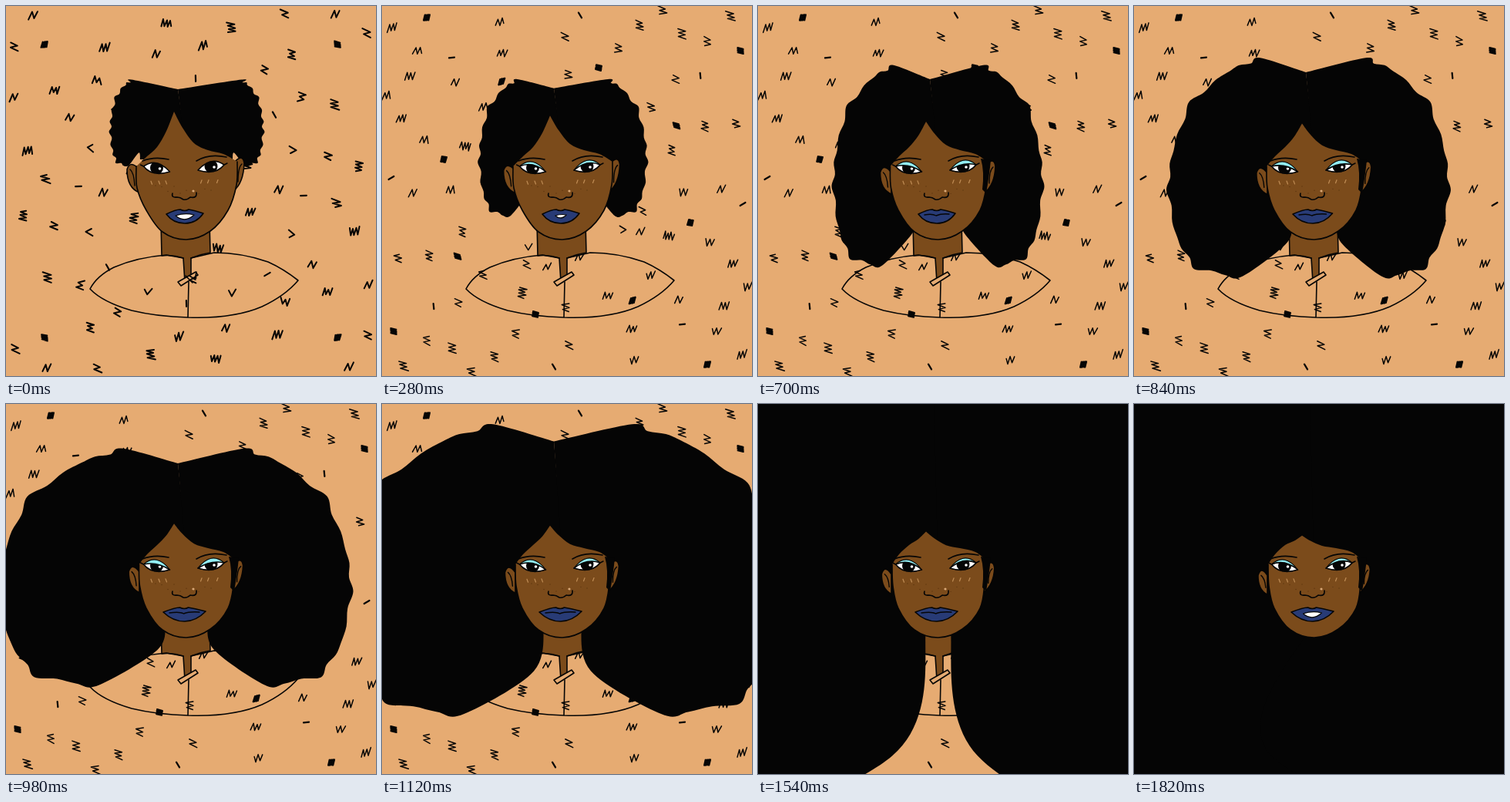
These frames come from a looping animation (480x480 px, 1960 ms). An HTML page with a canvas:

```html
<!DOCTYPE html>
<html>
<head>
<meta charset="utf-8">
<style>
html, body { margin: 0; width: 100%; height: 100%; overflow: hidden; background: #e6ab72; }
canvas { display: block; }
</style>
</head>
<body>
<canvas id="stage" width="480" height="480"></canvas>
<script>
const ctx = document.getElementById('stage').getContext('2d');
const STEP = 140, STEPS = 14;
const BG = '#e6ab72', INK = '#050505', SKIN = '#7b4b1b', LIP = '#283b76', SHADOW = '#92eef3', TICK = '#c08d55';

// x, y, strokes of each scribble; every one repeats at four quarter turns.
const FIRST = '35,12,3 50,50,9 128,54,5 118,96,4 63,109,5 10,118,3 83,145,3 28,188,6 141,132,1 195,62,3 208,22,6 256,51,4 427,10,3 187,107,2 296,109,2 163,213,5 205,166,6 354,238,3 94,234,1';
const REST = '13,28,5 58,15,9 46,57,4 90,67,1 36,91,5 95,99,3 6,116,4 25,146,5 55,173,4 80,199,9 108,182,7 12,223,1 40,242,3 89,238,4 153,20,4 156,61,5 155,98,9 132,131,4 187,104,5 145,188,3 290,167,2 266,142,3 224,154,3';

// One lobe of hair: distance out from the neck and down from the top, 0 to 1.
const LOBE = [[.4, 1], [.78, .96], [.93, .82], [1, .6], [.96, .42], [.82, .2], [.5, .05], [.25, 0]];
// step: left reach, right reach, top, bottom, half gap, parting, flare of the gap
const HAIR = {
  0: [136, 333, 97, 207, 60, 108, .05],
  3: [122, 348, 97, 305, 31, 106, .05],
  5: [98, 369, 79, 337, 31, 95, .05],
  7: [-9, 448, 60, 365, 27, 77, .05],
  9: [-90, 590, -3, 440, 21, 20, .05],
  11: [-680, 970, -300, 590, 15, -220, .05],
  13: [-680, 970, -300, 590, -4, -220, -.07]
};
const LID = { 0: [0], 3: [7], 7: [8], 9: [3.5], 13: [5] };

const lerp = (a, b, p) => a + (b - a) * p;
const clamp = x => Math.min(1, Math.max(0, x));

function tween(table, f) {
  const at = Object.keys(table).map(Number);
  const i = Math.max(1, at.findIndex(k => k >= f));
  const a = table[at[i - 1]], b = table[at[i]];
  return a.map((n, j) => lerp(n, b[j], (f - at[i - 1]) / (at[i] - at[i - 1])));
}
// Smooth curve through all points, appended to a path.
function spline(path, p, join) {
  path[join ? 'lineTo' : 'moveTo'](...p[0]);
  for (let i = 0; i < p.length - 1; i++) {
    const a = p[i - 1] || p[i], b = p[i], c = p[i + 1], d = p[i + 2] || c;
    path.bezierCurveTo(b[0] + (c[0] - a[0]) / 6, b[1] + (c[1] - a[1]) / 6,
      c[0] - (d[0] - b[0]) / 6, c[1] - (d[1] - b[1]) / 6, c[0], c[1]);
  }
}
function draw(path, fill, stroke, width = 1.6) {
  if (typeof path === 'string') path = new Path2D(path);
  if (fill) { ctx.fillStyle = fill; ctx.fill(path); }
  if (stroke) { ctx.strokeStyle = stroke; ctx.lineWidth = width; ctx.stroke(path); }
}
function dot(x, y, r, color) {
  ctx.fillStyle = color;
  ctx.beginPath();
  ctx.arc(x, y, r, 0, 7);
  ctx.fill();
}
function randoms(seed) {
  return () => (seed = (seed * 16807 + 11) % 2147483647) / 2147483647;
}

function scribble(n, seed) {
  const rnd = randoms(seed), path = new Path2D();
  const blob = n === 9, w = blob ? 7 : n === 1 ? 6 : 7 + n, tilt = rnd() * 6 - 3;
  for (let i = 0; i <= n; i++) {
    const side = i % 2 ? -1 : 1, amp = n === 1 ? 1 : blob ? 3.5 : 3 + 2.5 * rnd();
    path.lineTo((i / n - .5) * w + side * (rnd() - 1), side * amp + (i / n - .5) * tilt);
  }
  return path;
}
function scribbles(text, width) {
  for (const mark of text.split(' ')) {
    const [x, y, n] = mark.split(',').map(Number), path = scribble(n, x * 991 + y * 37);
    for (let turn = 0; turn < 4; turn++) {
      ctx.save();
      ctx.translate(240, 240);
      ctx.rotate(turn * Math.PI / 2);
      ctx.translate(x - 240, y - 240);
      draw(path, null, INK, n === 9 || n === 1 ? 2.2 : width);
      ctx.restore();
    }
  }
}

function body(f) {
  draw('M201 280L202 324Q216 322 230 327L232 358L240 352L240 327Q252 322 265 320L264 280Z', SKIN, INK);
  draw('M230 327L208 323Q170 326 140 339Q118 350 109 367Q125 384 163 395Q196 403 236 404Q295 406 332 390Q362 376 379 356Q360 341 340 332Q306 320 270 320L240 327M237 358L236 404', null, INK);
  draw('M223 358L246 345L249 349L227 363Z', BG, INK);
  if (f < 1) draw('M233 350L242 359M238 350L246 355M247 345L245 355', null, INK);
}

function lobe(edge, side, [, , top, bottom, half, parting, flare]) {
  const neck = 234 + side * half, w = edge - neck, h = bottom - top;
  const at = ([u, v]) => [neck + w * u, top + h * v];
  const p = [[neck, Math.min(285, bottom - 8)], at([flare, .85])];
  // Waves: every other point is pushed outwards.
  for (let t = 0; t < LOBE.length - .9; t += 1 / 3) {
    const i = Math.floor(t + .01), a = LOBE[i], b = LOBE[i + 1] || a;
    const [x, y] = at([0, 1].map(k => lerp(a[k], b[k], t - i)));
    const push = Math.round(t * 3) % 2 ? 2.5 : -.5;
    const dir = Math.atan2(y - (top + bottom) / 2, x - 234);
    p.push([x + push * Math.cos(dir), y + push * Math.sin(dir)]);
  }
  p.push([223, parting]);
  const path = new Path2D();
  spline(path, p);
  path.lineTo(234 - side, 190);
  path.lineTo(234 - side, p[0][1]);
  draw(path, INK);
}

function ears(f) {
  const t = 204 + f * .8, b = 242 + f * .4, x = 299 - f * .2, l = 157 + f * .3;
  draw(`M173 ${t + 8}Q${l + 4} ${t - 5} ${l} ${t + 8}Q${l} ${b - 6} 173 ${b}Z`, SKIN, INK);
  draw(`M${l + 4} ${t + 8}Q${l + 9} ${t + 12} ${l + 10} ${b - 9}`, null, INK, 1.4);
  draw(`M${x - 4} ${t}Q${x + 8} ${t - 14} ${x + 10} ${t}Q${x + 9} ${b - 12} ${x - 4} ${b - 2}Z`, SKIN, INK);
  draw(`M${x + 7} ${t + 1}Q${x + 2} ${t + 5} ${x + 2} ${b - 14}`, null, INK, 1.4);
}

function eye(x, y, s, lid) {
  const out = `${x - 17 * s} ${y - 3}`, inner = `${x + 17 * s} ${y + 4}`;
  const almond = drop => new Path2D(`M${out}Q${x} ${y - 15 + drop} ${inner}Q${x - 6 * s} ${y + 11} ${out}Z`);
  if (lid) draw(almond(-3), SHADOW, INK, 1.2);
  const open = almond(lid);
  ctx.save();
  draw(open, '#fff');
  ctx.clip(open);
  dot(x, y - 1, 8.5, INK);
  dot(x + 4, y, 1.8, '#fff');
  ctx.restore();
  draw(open, null, INK, 1.6);
  draw(`M${out}l${-4 * s} -2`, null, INK, 1.4);
}

function mouth(f) {
  const wide = clamp((f - 5) / 2), open = f < 5 ? 1 - f / 5 : clamp((f - 11) / 2);
  const l = 208 - 4 * wide, r = 256 + 3 * wide, m = (l + r) / 2, w = 12 * open;
  draw(`M${l} 270Q${m - 12} 264 ${m - 6} 264Q${m} 267 ${m + 5} 264Q${m + 12} 265 ${r} 269Q${m + 15} 282 ${m} 282Q${m - 15} 282 ${l} 270Z`, LIP, INK);
  if (open) draw(`M${m - w} 272Q${m} ${272 - 4 * open} ${m + w} 271Q${m} ${273 + 9 * open} ${m - w} 272Z`, '#fff', INK, 1.2);
  else draw(`M${l + 8} 271Q${m - 6} 269 ${m - 1} 272Q${m + 6} 269 ${r - 8} 270`, null, INK, 1.4);
}

function face(f) {
  ears(f);
  const peak = 137 + 2.6 * f, inset = Math.min(f, 10) * .5;
  const top = [218, peak], skin = new Path2D(), chin = new Path2D();
  const left = [[169 + inset, 208], [183, 195], [196, 183], [208, lerp(183, peak, .45)], top];
  const right = [top, [229, lerp(peak, 187, .42)], [244, lerp(peak, 187, .82)], [262, 187], [282, 192], [300 - inset, 202]];
  const jaw = [right[5], [299 - inset, 232], [288, 265], [265, 292], [234, 303], [203, 293], [182, 265], [170 + inset, 236], left[0]];
  spline(skin, left);
  spline(skin, right, true);
  spline(skin, jaw, true);
  spline(chin, jaw);
  draw(skin, SKIN);
  draw(chin, null, INK);
  if (f > 3) draw('M289 198Q294 215 291 238L296 243Q300 220 302 200Z', INK);

  draw('M177 201Q192 195 211 199M247 201Q263 191 286 196', null, INK, 1.6);
  const [lid] = tween(LID, f);
  eye(195.5, 211, 1, lid);
  eye(266, 209, -1, lid);
  for (const x of [188, 198, 207, 254, 263, 275])
    draw(`M${x} ${231 - x / 50}l${x < 230 ? 1.5 : -1.5} 4`, null, TICK, 1.2);
  const rnd = randoms(77);
  for (let i = 0; i < 10; i++) dot(194 + i * 8, 233 + rnd() * 12, .7, '#5c3510');
  draw('M216 243Q214 249 222 248Q226 248 230 251Q235 252 239 248Q248 250 247 242', null, INK, 1.6);
  dot(243, 240, 1.6, '#d9a876');
  mouth(f);
}

function render(f) {
  ctx.fillStyle = BG;
  ctx.fillRect(0, 0, 480, 480);
  if (f < 1) scribbles(FIRST, 2);
  else scribbles(REST, 1.5);
  body(f);
  const hair = tween(HAIR, f);
  lobe(hair[0], -1, hair);
  lobe(hair[1], 1, hair);
  face(f);
}

ctx.lineJoin = ctx.lineCap = 'round';
const start = performance.now();
function tick(now) {
  render(Math.floor(Math.max(0, now - start) / STEP) % STEPS);
  requestAnimationFrame(tick);
}
render(0);
requestAnimationFrame(tick);
</script>
</body>
</html>
```
